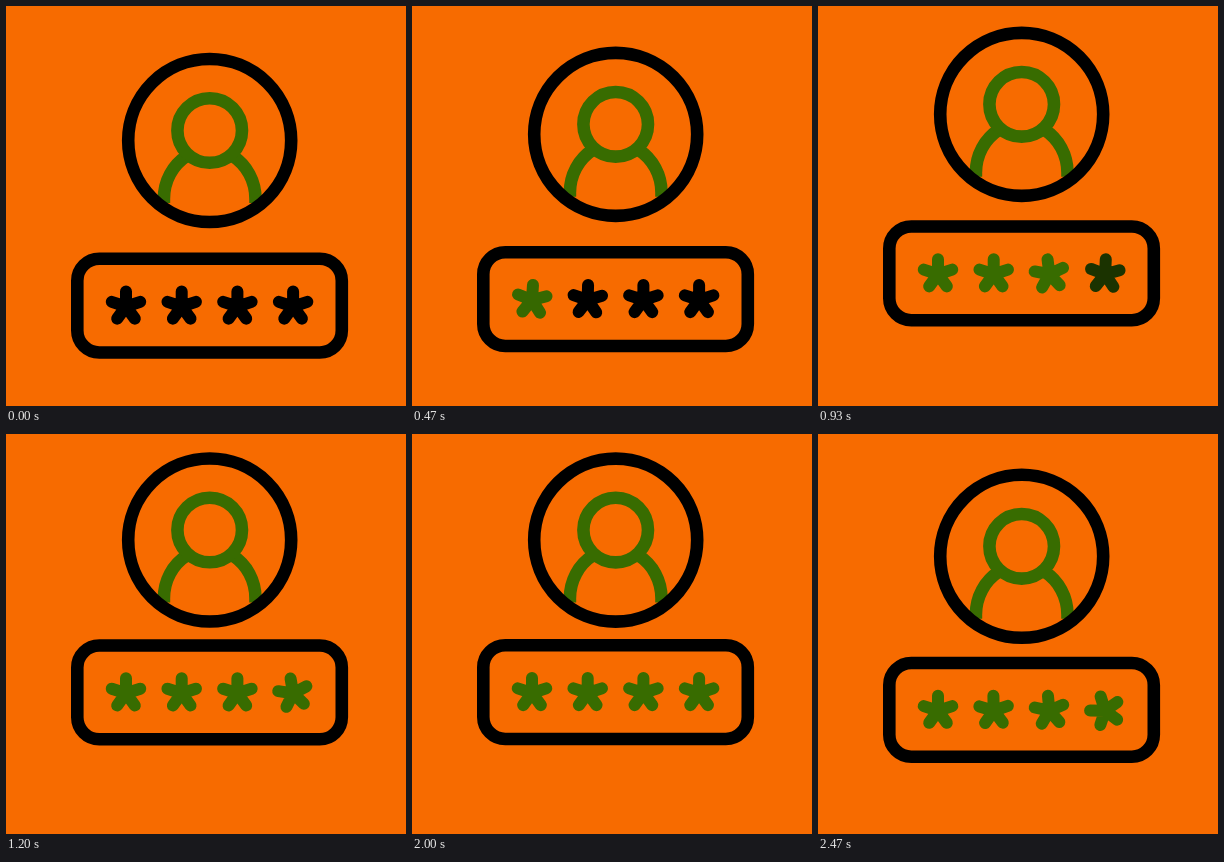
Write an HTML page with a canvas that moves like this. It is 400 by 400 pixels and loops after 2540 ms.

```html
<!DOCTYPE html>
<html lang="en">
<head>
<meta charset="utf-8">
<title>Login</title>
<style>
  html, body { margin: 0; width: 100%; height: 100%; overflow: hidden; background: #f76b00; }
  canvas { display: block; width: 400px; height: 400px; }
</style>
</head>
<body>
<canvas id="stage" width="400" height="400"></canvas>
<script>
const ctx = document.getElementById('stage').getContext('2d');
const LOOP = 2540, FPS = 15, LAST_STEP = 37;
const ORANGE = '#f76b00', BLACK = '#000', GREEN = [56, 108, 0];
const CENTER_X = 203.7, LINE = 12.6;

const clamp = v => Math.min(1, Math.max(0, v));
const progress = (t, start, duration) => clamp((t - start) / duration);
const ease = u => u * u * (3 - 2 * u);
const greenMix = k => `rgb(${GREEN.map(c => Math.round(c * k)).join(',')})`;

// Rises, rests at the top, then starts to sink again.
function lift(t, height, up, upTime, down, downTime) {
  return -height * (ease(progress(t, up, upTime)) - ease(progress(t, down, downTime)));
}

function strokeCircle(x, y, r) {
  ctx.beginPath();
  ctx.arc(x, y, r, 0, Math.PI * 2);
  ctx.stroke();
}

function drawShoulder(side) {
  const x = d => CENTER_X + side * d;
  ctx.beginPath();
  ctx.moveTo(x(45.8), 197);
  ctx.lineTo(x(45.8), 193);
  ctx.bezierCurveTo(x(45.8), 175, x(37), 159, x(23), 150);
  ctx.stroke();
}

function drawAvatar(dy) {
  ctx.save();
  ctx.translate(0, dy);
  ctx.lineWidth = LINE;
  ctx.strokeStyle = greenMix(1);
  drawShoulder(-1);
  drawShoulder(1);
  strokeCircle(CENTER_X, 124.5, 32.3);
  ctx.strokeStyle = BLACK;
  strokeCircle(CENTER_X, 134.5, 81.5);
  ctx.restore();
}

function drawStar(x, y, angle, color) {
  ctx.save();
  ctx.translate(x, y);
  ctx.rotate(angle);
  ctx.strokeStyle = color;
  ctx.lineWidth = 12;
  ctx.lineCap = 'round';
  ctx.beginPath();
  for (let i = 0; i < 5; i++) {
    const a = i * Math.PI * 0.4;
    ctx.moveTo(0, 0);
    ctx.lineTo(15 * Math.sin(a), -15 * Math.cos(a));
  }
  ctx.stroke();
  ctx.restore();
}

function drawField(dy, t) {
  ctx.save();
  ctx.translate(0, dy);
  ctx.lineWidth = LINE;
  ctx.strokeStyle = BLACK;
  ctx.beginPath();
  ctx.roundRect(71.3, 252.7, 264.5, 93.8, 22);
  ctx.stroke();

  const backStarts = [2465, 2450, 2430, 2400];
  backStarts.forEach((backStart, i) => {
    const spin = progress(t, 274 + i * 177, 438);
    const back = progress(t, backStart, 500);
    const angle = 2 * Math.PI * (ease(spin) - ease(back));
    const mix = clamp((spin - 0.15) / 0.3) - clamp((back - 0.15) / 0.3);
    drawStar(120 + i * 55.7, 300.5, angle, greenMix(mix));
  });
  ctx.restore();
}

function render(now) {
  const step = Math.min(LAST_STEP, Math.floor((now % LOOP + 5) * FPS / 1000));
  const t = step * 1000 / FPS;
  ctx.fillStyle = ORANGE;
  ctx.fillRect(0, 0, 400, 400);
  drawAvatar(lift(t, 28.5, 200, 890, 1973, 900));
  drawField(lift(t, 41.5, 204, 1050, 2047, 930), t);
}

const start = performance.now();
function tick() {
  render(performance.now() - start);
  requestAnimationFrame(tick);
}
tick();
</script>
</body>
</html>
```
